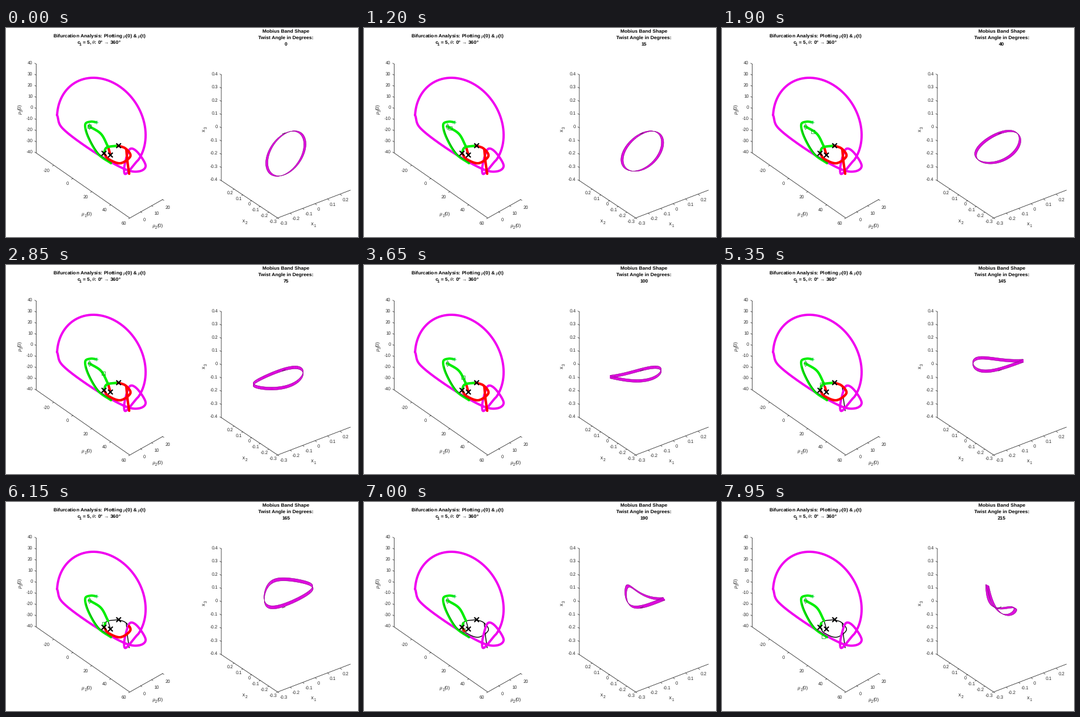
A matplotlib script for the animation above (8000 ms loop, 600x357 px).

```python
import numpy as np
import matplotlib.pyplot as plt
from matplotlib.animation import FuncAnimation
from matplotlib.collections import PolyCollection

PX = 0.72  # points per pixel at 100 dpi
INTERVAL, FRAMES = 50, 160
MAGENTA, GREEN, RED, INK = "#f000f0", "#00ee00", "#ff0000", "#262626"

plt.rcParams.update({
    "font.family": "Liberation Sans",
    "text.hinting": "none",
    "mathtext.fontset": "custom",
    "mathtext.rm": "Liberation Sans",
    "mathtext.it": "Liberation Serif:italic",
    "mathtext.bf": "Liberation Sans:bold",
})

fig = plt.figure(figsize=(6, 3.57), dpi=100, facecolor="white")
ax = fig.add_axes([0, 0, 1, 1])
ax.set_xlim(0, 600)
ax.set_ylim(357, 0)
ax.axis("off")


def smooth(*points, steps=16):
    """Open Catmull-Rom curve through the points."""
    p = np.array(points, float)
    p = np.vstack([2 * p[0] - p[1], p, 2 * p[-1] - p[-2]])
    t = np.linspace(0, 1, steps, endpoint=False)[:, None]
    parts = [0.5 * (2 * b + (c - a) * t + (2 * a - 5 * b + 4 * c - d) * t**2
                    + (3 * b - a - 3 * c + d) * t**3)
             for a, b, c, d in zip(p, p[1:], p[2:], p[3:])]
    return np.vstack(parts + [p[-2][None]])


def stroke(curve, color, width, z=2, **kw):
    line, = ax.plot(curve[:, 0], curve[:, 1], color=color, lw=width * PX, zorder=z,
                    solid_capstyle="round", solid_joinstyle="round", **kw)
    return line


def label(x, y, text, size=7.7, ha="center", va="center", color=INK, **kw):
    return ax.text(x, y, text, fontsize=size * PX, ha=ha, va=va, color=color, **kw)


def title(x, baseline, text, size=8.4):
    return label(x, baseline, text, size, va="baseline", color="black", weight="bold")


def axis_name(x, y, symbol, index, tail="", upright=False):
    """Symbol with a lowered index, optionally read upwards."""
    along, below = np.array([(0, -1), (1, 0)] if upright else [(1, 0), (0, 1)])
    start = np.array([x, y]) - along * (7 if tail else 2)
    rotation = 90 if upright else 0
    style = dict(family="Liberation Serif", style="italic") if symbol == "μ" else {}
    label(*start, symbol, 8.6, rotation=rotation, **style)
    label(*(start + 4.4 * along + 3.3 * below), index, 6.8, rotation=rotation)
    label(*(start + 11.5 * along), tail, 8.4, rotation=rotation)


def ruler(names, first, step, tick, offset, ha):
    """Ticks and numbers at even steps along one axis."""
    for i, name in enumerate(names):
        x, y = first[0] + i * step[0], first[1] + i * step[1]
        ax.plot([x, x + tick[0]], [y, y + tick[1]], color=INK, lw=0.7 * PX)
        label(x + offset[0], y + offset[1], name, ha=ha)


def frame_lines(*corners):
    ax.plot(*zip(*corners), color=INK, lw=0.8 * PX, solid_joinstyle="miter")


# Left axes
frame_lines((51.5, 61.5), (51.5, 213.5), (211, 324.6), (267, 293))
ruler(range(40, -41, -10), (51.5, 61.5), (0, 19), (-2.5, -1.5), (-6, -1.5), "right")
ruler(range(-20, 61, 20), (81.5, 234.5), (32.4, 22.5), (-2.2, 1.3), (-6.5, 9.2), "right")
ruler((0, 10, 20), (229.5, 314), (18.7, -10.5), (2.2, 1.5), (4.5, 13.5), "left")
axis_name(137.5, 318, "μ", "1", "(0)")
axis_name(258, 338, "μ", "2", "(0)")
axis_name(24, 139, "μ", "3", "(0)", upright=True)
title(159, 16, r"Bifurcation Analysis: Plotting $\mu$(0) & $\mu$(t)")
title(159, 26.5, r"c  = 5, $\theta$: 0° → 360°")
title(126.8, 30, "1", 6.8)

# Right axes
frame_lines((367, 80), (367, 260.7), (463, 324.5), (587, 277))
tenths = lambda a, b: [f"{v / 10:g}" for v in range(a, b, 1 if b > a else -1)]
ruler(tenths(4, -5), (367, 80), (0, 22.6), (-2.5, -1.5), (-6, -1.5), "right")
ruler(tenths(2, -4), (389, 275.2), (14.8, 9.86), (-2.2, 1), (-1.5, 6.3), "right")
ruler(tenths(-3, 3), (463, 324.5), (21.4, -8), (2.2, 1.5), (3.4, 9.8), "left")
axis_name(407, 330, "x", "2")
axis_name(524, 334.5, "x", "1")
axis_name(338, 173, "x", "3", upright=True)
title(477, 8.7, "Mobius Band Shape")
title(477, 19.2, "Twist Angle in Degrees:")
angle_text = title(477, 29.5, "0")

# Bifurcation curves: a tilted ellipse arc closed by a knot
s = np.radians(np.linspace(-177, 33, 120))
arc = np.column_stack([162.5 + 75.5 * np.cos(s), 168 + 15 * np.cos(s) + 81.6 * np.sin(s)])
knot = smooth(arc[-1], (222, 229), (206, 248), (201.5, 246), (203, 230), (211, 207),
              (224, 212), (238, 235), (226, 245), (200, 240), (146, 209), (97, 172), arc[0])
left_green = smooth((154, 161), (144, 160), (135, 165), (140, 186), (157, 215), (179, 231))
right_green = smooth((142, 168), (162, 181), (174, 203))
upper_green = smooth((191, 201), (172, 204), (167, 214))
ring = smooth((191, 201), (204, 206), (212, 219), (195, 231), (175, 224), (167, 214))
stem = smooth((174, 203), (178, 217))
tail = smooth((205, 207), (207, 228), (210, 249))

for hidden in (upper_green, ring, stem, tail):
    stroke(hidden, "black", 1.4)
stroke(np.vstack([arc, knot]), MAGENTA, 3.9, 3)
stroke(left_green, GREEN, 4, 3)
stroke(left_green[40:] + (0.8, -0.5), "#087008", 0.7, 4)
stroke(right_green, GREEN, 4.2, 3)

# (curve, colour, start ms, end ms, part left at the end)
erasures = [
    (tail, RED, 4750, 5300, 0),
    (stem, RED, 5200, 5600, 0),
    (upper_green, GREEN, 5300, 6150, 0.35),
    (ring, RED, 5700, 7200, 0),
]
vanishing = [stroke(curve, color, 4.2, 5) for curve, color, *_ in erasures]

for x, y in ((167, 214), (178, 217), (191.5, 200.5)):
    ax.plot(x, y, "x", color="black", ms=7.5 * PX, mew=2.1 * PX, zorder=8)
for turn in np.arange(4) * np.pi / 4:
    dx, dy = 3 * np.cos(turn), 3 * np.sin(turn)
    ax.plot([154 - dx, 154 + dx], [161 - dy, 161 + dy], color="#20d850", lw=0.7 * PX, zorder=6)
hollow = dict(mfc="none", mec="#10a020", mew=0.8 * PX, zorder=7)
ax.plot(142, 168, "d", ms=7.5 * PX, **hollow)
square, = ax.plot([], [], "s", ms=5.5 * PX, **hollow)

# Key poses by twist angle. The centre line is a short Fourier series:
# x: mean, cos, sin, cos 2; y: mean, cos, sin, cos 2, sin 2.
# Then the band's width and its direction, and the square's place.
KEYS = {
    0: (477, 32.5, 0, 0, 214.5, -16, 35, 0, 0, 4, -12, 142, 168),
    75: (464, 42.5, 0, 0, 195, -10, 14.5, -1, 2.7, 5, 90, 166, 185),
    130: (462, 44.5, 0, 0, 178.7, 0, 1, -3.2, 3.7, 4.5, 90, 173, 201),
    165: (477, 40.5, 8, 5, 153.3, -3, -23.3, -2.2, 3, 5.5, 85, 167, 208),
    215: (471.5, 24, 1, 4.5, 172.3, 20, 1, -9.3, 5.5, 5.5, 27, 173, 230),
}
TABLE = np.array(list(KEYS.values())).T
u = np.linspace(0, 2 * np.pi, 121)
BASIS = np.array([np.ones_like(u), np.cos(u), np.sin(u), np.cos(2 * u), np.sin(2 * u)])

band = ax.add_collection(PolyCollection([], facecolor="#dc00dc", edgecolor="#dc00dc",
                                        linewidth=0.3 * PX, zorder=3))
edges = [stroke(BASIS[:2].T, "#601060", 0.6, 4, alpha=0.6) for _ in range(2)]
ax.plot([471, 476], [181, 179], color="#502050", lw=0.9 * PX, zorder=5)


def twist_angle(t):
    """Twist in degrees, advancing in steps of five."""
    raw = np.interp(t, [770, 1900, 2850, 3650, 4650, 6150, 7950],
                    [0, 40, 75, 100, 130, 165, 215])
    return 5 * int(round(raw / 5))


def update(frame):
    t = frame * INTERVAL
    angle = twist_angle(t)
    angle_text.set_text(str(angle))

    pose = [np.interp(angle, list(KEYS), row) for row in TABLE]
    centre = np.column_stack([pose[:4] @ BASIS[:4], pose[4:9] @ BASIS])
    width, heading = pose[9], np.radians(pose[10])
    half = width / 2 * np.array([np.cos(heading), np.sin(heading)])
    a, b = centre - half, centre + half
    band.set_verts(np.stack([a[:-1], a[1:], b[1:], b[:-1]], axis=1))
    for line, side in zip(edges, (a, b)):
        line.set_data(side.T)
    square.set_data([pose[11]], [pose[12]])

    for line, (curve, _, start, end, rest) in zip(vanishing, erasures):
        gone = np.interp(t, [start, end], [0, 1 - rest])
        line.set_data(curve[int(round(gone * len(curve))):].T)


anim = FuncAnimation(fig, update, frames=FRAMES, interval=INTERVAL,
                     init_func=lambda: update(0), repeat=True, repeat_delay=0)
plt.show()
```
